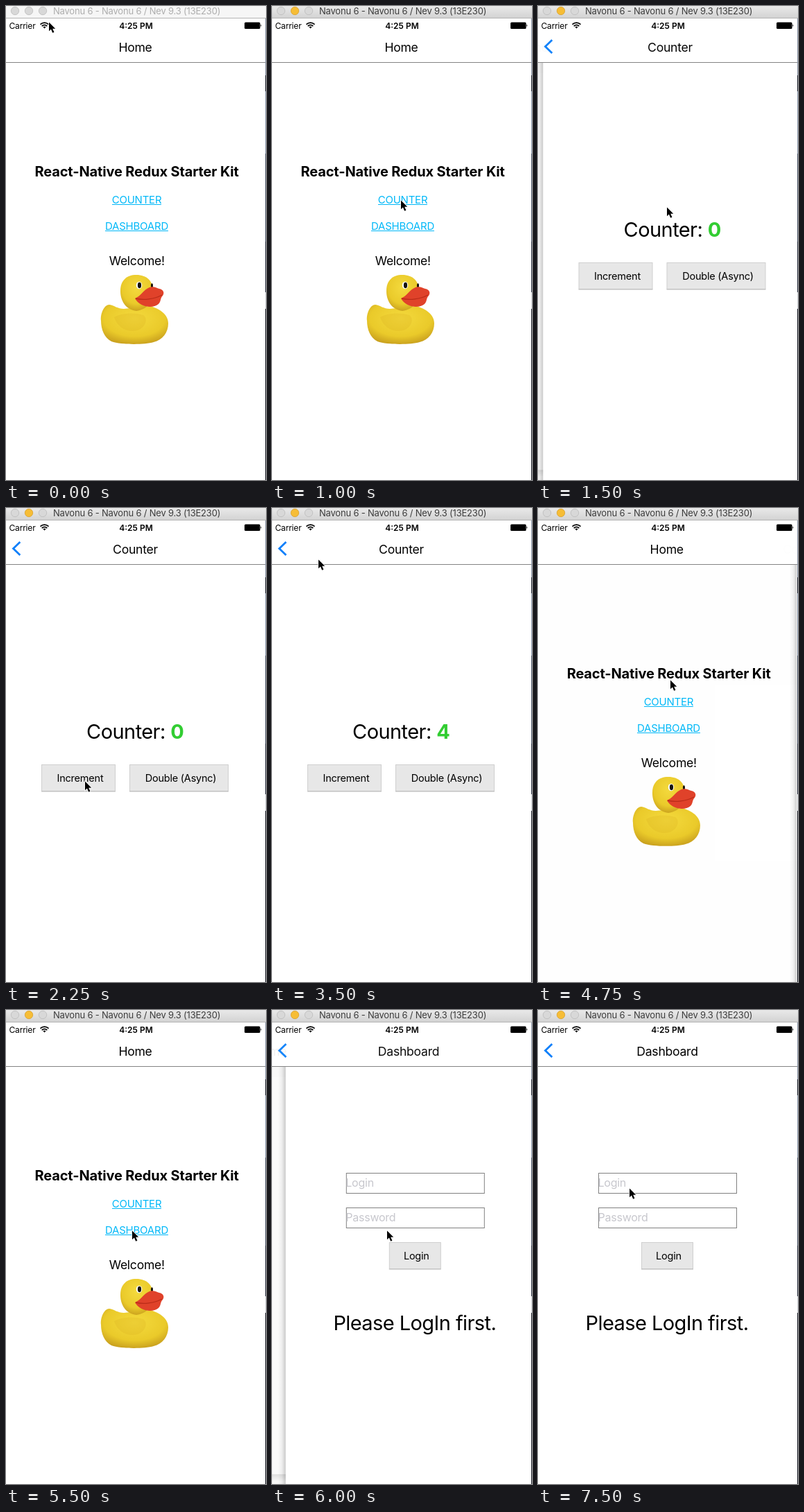
An HTML page that plays this animation: 375x684 px, repeating every 8000 ms.

```html
<!DOCTYPE html>
<html lang="en">
<head>
<meta charset="utf-8">
<title>Starter kit demo</title>
<style>
  html, body { margin: 0; width: 100%; height: 100%; overflow: hidden; background: #fff; }
  svg { display: block; width: 375px; height: 684px; }
  text { font-family: Inter, Roboto, "Liberation Sans", sans-serif; letter-spacing: -.015em; }
  .mid { text-anchor: middle; }
  .bar { font-size: 13px; }
  .status { font-size: 12px; }
  .head { font-size: 17.6px; }
  .link { font-size: 15px; fill: #00b8f8; }
  .big { font-size: 29px; letter-spacing: -.02em; }
  .label { font-size: 14.5px; }
  .hint { font-size: 16px; fill: #c7c7cd; }
  .box { fill: #e7e7e7; stroke: #cfcfcf; }
  .field { fill: #fff; stroke: #808080; }
</style>
</head>
<body>
<svg viewBox="0 0 375 684">
  <defs>
    <linearGradient id="side"><stop offset="0" stop-opacity="0"/><stop offset=".5" stop-opacity=".05"/><stop offset="1" stop-opacity=".2"/></linearGradient>
    <linearGradient id="under" x2="0" y2="1"><stop offset="0" stop-opacity=".3"/><stop offset="1" stop-opacity="0"/></linearGradient>
    <linearGradient id="chrome" x2="0" y2="1"><stop offset="0" stop-color="#e9e9e9"/><stop offset="1" stop-color="#d3d3d3"/></linearGradient>
    <radialGradient id="yellow" cx=".5" cy=".35" r=".7"><stop offset="0" stop-color="#f4da3e"/><stop offset=".65" stop-color="#eaca2a"/><stop offset="1" stop-color="#c49a1c"/></radialGradient>
  </defs>

  <rect width="375" height="684" fill="#f8f8f8"/>

  <g id="home">
    <rect y="684" width="375" height="11" fill="url(#under)"/>
    <rect y="82" width="375" height="602" fill="#fff"/>
    <text class="mid" x="188.7" y="245.5" font-size="20" font-weight="700" style="letter-spacing:-.15px">React-Native Redux Starter Kit</text>
    <text class="link mid" x="188.5" y="284.6">COUNTER</text>
    <text class="link mid" x="188.5" y="322.6">DASHBOARD</text>
    <path d="M153 286.5h71M143 324.5h91" stroke="#00b8f8"/>
    <text class="head mid" x="188.8" y="374">Welcome!</text>
    <g>
      <path d="M137 454C136 443 142 431 149 431C156 432 161 437 170 437L208 433C222 437 234 445 234 458C234 471 226 482 213 485C199 489 166 489 152 484C142 479 137 467 137 454Z" fill="url(#yellow)"/>
      <path d="M165 411C165 396 174 388 188 388C203 388 212 397 212 411C212 426 204 438 188 440C172 438 165 425 165 411Z" fill="url(#yellow)"/>
      <path d="M156 449C164 444 183 441 198 446C205 451 202 463 190 468C176 472 161 465 156 449Z" fill="#d9b422" opacity=".3"/>
      <ellipse cx="192" cy="403" rx="4.2" ry="5.2" fill="#fff"/>
      <ellipse cx="192.5" cy="403" rx="2.6" ry="4.2" fill="#16120c"/>
      <ellipse cx="210.5" cy="403.5" rx="1.5" ry="3.2" fill="#16120c"/>
      <path d="M186 422C194 419 199 409 207 406C213 404 217 407 221 408C227 409 229 414 226 418C222 422 224 426 220 430C212 437 193 435 186 422Z" fill="#e0422a"/>
      <path d="M187 422C198 425 214 423 225 417" fill="none" stroke="#b92c18" stroke-width="1.4"/>
    </g>
  </g>

  <g id="counter">
    <rect x="-11" y="82" width="11" height="602" fill="url(#side)"/>
    <rect y="82" width="375" height="602" fill="#fff"/>
    <text class="big mid" x="186.2" y="333">Counter: <tspan id="count" font-weight="700" fill="#32cd32">0</tspan></text>
    <g>
      <rect class="box" x="51.5" y="370.5" width="106" height="38"/>
      <path d="M51 409h107" stroke="#b9b9b9"/>
      <text class="label mid" x="107" y="395">Increment</text>
    </g>
    <g id="double">
      <rect class="box" x="178.5" y="370.5" width="142" height="38"/>
      <path d="M178 409h143" stroke="#b9b9b9"/>
      <text class="label mid" x="252" y="395">Double (Async)</text>
    </g>
  </g>

  <g id="dash">
    <rect x="-11" y="82" width="11" height="602" fill="url(#side)"/>
    <rect y="82" width="375" height="602" fill="#fff"/>
    <rect class="field" x="87.5" y="235.5" width="199" height="29"/>
    <rect class="field" x="87.5" y="285.5" width="199" height="29"/>
    <text class="hint" x="86.5" y="255">Login</text>
    <text class="hint" x="86.5" y="305">Password</text>
    <rect class="box" x="149.5" y="335.5" width="74" height="38"/>
    <path d="M149 374h75" stroke="#b9b9b9"/>
    <text class="label mid" x="188.5" y="360">Login</text>
    <text class="big mid" x="186" y="462">Please LogIn first.</text>
  </g>

  <rect y="18" width="375" height="64" fill="#fff"/>
  <path d="M0 81.5h375" stroke="#838383"/>
  <text id="homeHead" class="head mid" x="186.5" y="65.5">Home</text>
  <text id="counterHead" class="head mid" x="186.5" y="65.5">Counter</text>
  <text id="dashHead" class="head mid" x="186.5" y="65.5">Dashboard</text>
  <path id="back" d="M20.3 49L10.5 58.5L20.3 68" fill="none" stroke="#0a7ffa" stroke-width="2.8"/>

  <text class="status" x="4.5" y="32.5">Carrier</text>
  <g fill="none" stroke="#000" stroke-width="1.7">
    <path d="M49.5 26.6C53 23.2 58 23.2 61.5 26.6M51.7 29C54 27 57 27 59.3 29"/>
    <path d="M53.4 30.3Q55.5 28.8 57.6 30.3L55.5 32.6Z" fill="#000" stroke="none"/>
  </g>
  <text class="status mid" x="187.5" y="32.5" font-weight="600" style="letter-spacing:0">4:25 PM</text>
  <rect x="344" y="23.5" width="22.5" height="9.5" rx="1.5"/>
  <path d="M367.3 26.3q2 1.9 0 3.8z"/>

  <g id="edge"></g>

  <rect id="bar" width="375" height="17"/>
  <path d="M0 17.5h375" stroke="#b4b4b4"/>
  <g stroke-width=".8">
    <circle cx="13" cy="7" r="5.7" fill="#d8d8d8" stroke="#bcbcbc"/>
    <circle id="amber" cx="33" cy="7" r="5.7"/>
    <circle cx="53" cy="7" r="5.7" fill="#d8d8d8" stroke="#bcbcbc"/>
  </g>
  <text id="barText" class="bar" x="68" y="12">Navonu 6 - Navonu 6 / Nev 9.3 (13E230)</text>

  <path id="cursor" d="M0 .5V13.2L2.9 10.5L5.2 15.8L7.4 14.8L5.2 9.7H9.2Z" stroke="#fff" stroke-width="1.5" paint-order="stroke"/>
</svg>

<script>
const LOOP = 8000, STEP = 250, WIDTH = 375;
const $ = id => document.getElementById(id);

// Pointer tip, one place per step; the last one holds.
const pointer = [
  [62, 23], [88, 76], [150, 205], [185, 272], [186, 280], [186, 286],
  [186, 290], [162, 328], [124, 382], [114, 394], [114, 395], [114, 395],
  [226, 402], [222, 398], [67, 74], [37, 72], [14, 58], [14, 58],
  [92, 142], [191, 248], [187, 308], [185, 316], [182, 318], [172, 318],
  [166, 318], [148, 287], [132, 257]
];

// [step, value]: a value holds until the next entry.
const counterX = [[0, 375], [5, 190], [6, 7.5], [7, 0], [18, 190], [19, 373.5], [20, 375]];
const dashX = [[0, 375], [23, 200], [24, 19.8], [25, 1], [26, 0]];
const counts = [[0, 0], [10, 1], [11, 2], [13, 4]];

const at = (table, n) => table.filter(([step]) => step <= n).pop()[1];

// [top, bottom, colour] of the sliver beside the window
[[18, 100, "#8c96a8"], [100, 123, "#1c202c"], [123, 213, "#8f9bb0"], [213, 340, "#4b5468"],
 [340, 413, "#2b3040"], [413, 437, "#d5d8dd"], [437, 684, "#171a24"]].forEach(([top, end, fill]) => {
  const r = document.createElementNS("http://www.w3.org/2000/svg", "rect");
  Object.entries({ x: 374, y: top, width: 1, height: end - top, fill }).forEach(([k, v]) => r.setAttribute(k, v));
  $("edge").append(r);
});

const move = (id, x, y = 0) => $(id).setAttribute("transform", `translate(${x} ${y})`);
const fade = (id, v) => $(id).setAttribute("opacity", v);

function head(id, x, alpha) {
  move(id, x);
  fade(id, alpha);
}

function draw(n) {
  const cx = at(counterX, n), dx = at(dashX, n);
  const pc = 1 - cx / WIDTH, pd = 1 - dx / WIDTH, p = Math.max(pc, pd);

  const scale = 1 - .05 * p;
  $("home").setAttribute("transform",
    `translate(${187.5 - 10 * p} 383) scale(${scale}) translate(-187.5 -383)`);
  fade("home", 1 - .7 * p);

  for (const [id, x] of [["counter", cx], ["dash", dx]]) {
    move(id, x);
    $(id).style.display = x < WIDTH ? "" : "none";
  }
  head("homeHead", -200 * p, 1 - p);
  head("counterHead", 200 * (1 - pc), pc);
  head("dashHead", 200 * (1 - pd), pd);
  fade("back", p < .02 ? 0 : p);

  $("count").textContent = at(counts, n);
  fade("double", n === 12 ? .6 : 1);

  const active = n >= 3;
  $("bar").setAttribute("fill", active ? "url(#chrome)" : "#f6f6f6");
  $("barText").setAttribute("fill", active ? "#3c3c3c" : "#adadad");
  $("amber").setAttribute("fill", active ? "#f6bd36" : "#d8d8d8");
  $("amber").setAttribute("stroke", active ? "#d9a02b" : "#bcbcbc");

  move("cursor", ...pointer[Math.min(n, pointer.length - 1)]);
}

function tick() {
  draw(Math.floor(performance.now() % LOOP / STEP));
  requestAnimationFrame(tick);
}
tick();
</script>
</body>
</html>
```
